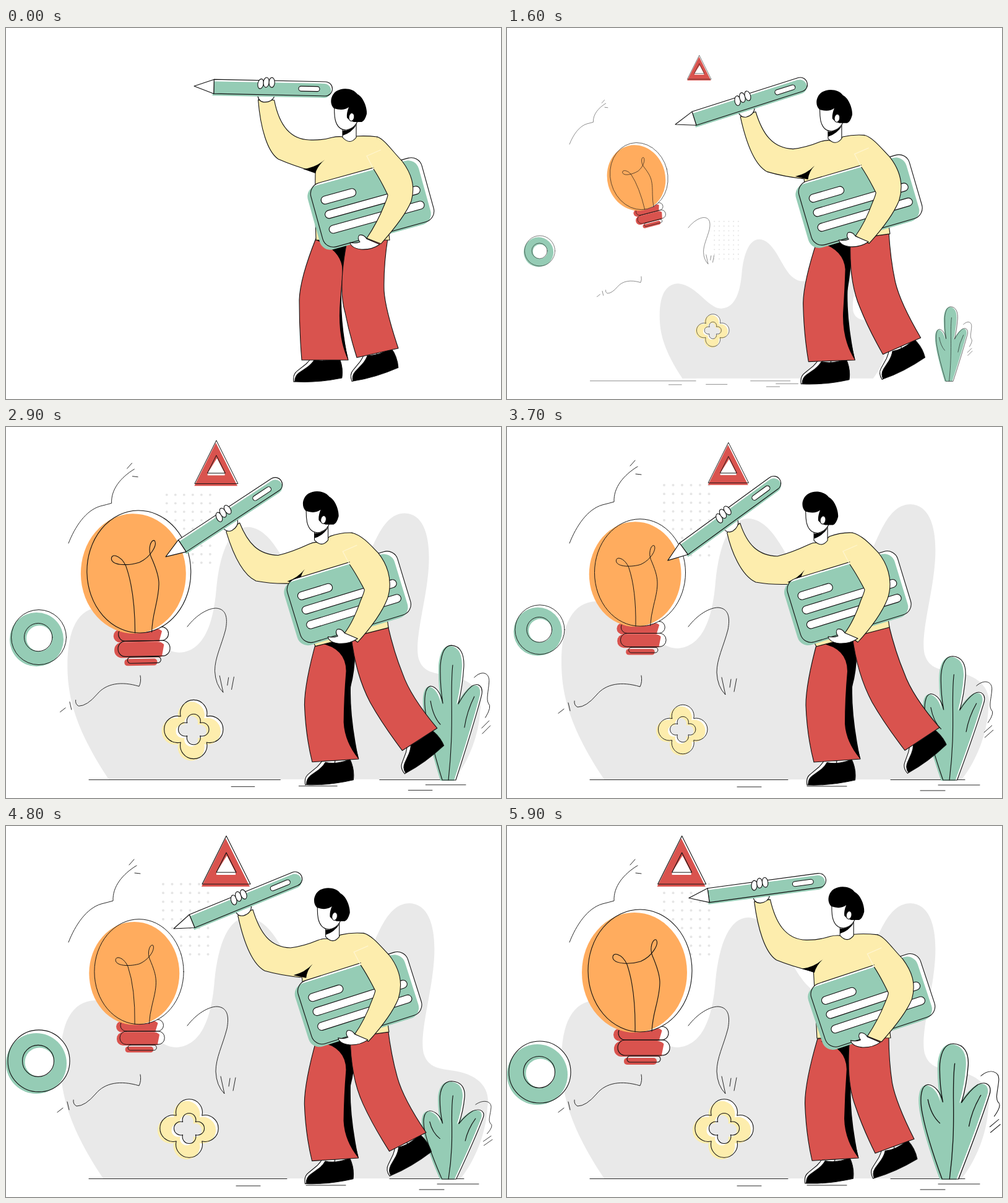
Recreate the animation shown at these times as an HTML page. Size 800x600 px, loop 6 s.

```html
<!DOCTYPE html>
<html lang="en">
<head>
<meta charset="utf-8">
<title>Idea and pencil</title>
<style>
html, body { margin: 0; width: 100%; height: 100%; overflow: hidden; background: #fff; }
svg { display: block; width: 800px; height: 600px; }
.ink { stroke: #111; stroke-width: 1.1; stroke-linejoin: round; stroke-linecap: round; }
.line { fill: none; }
.thin { stroke-width: .9; }
.white { fill: #fff; }
.green { fill: #95ccb5; }
.yellow { fill: #fdedad; }
.red { fill: #d9534e; }
.orange { fill: #ffac5e; }
.grey { fill: #e9e9e9; }
</style>
</head>
<body>
<svg viewBox="0 0 800 600">
  <defs>
    <path id="tri" d="M0-56L39 22H-39Z"/>
    <path id="penBody" d="M32-11.5H212A11.5 11.5 0 0 1 212 11.5H32Z"/>
    <rect id="card" x="-93" y="-53.5" width="186" height="107" rx="18"/>
    <path id="leaves" d="M705 571Q685 505 679 468C674 440 677 420 686 419C696 420 703 432 706 447Q701 415 702 385C704 362 711 353 720 353C735 354 741 368 740 388Q738 420 731 448Q742 428 753 419C765 412 773 421 768 437Q755 485 727 571Z"/>
    <path id="flowerShape" fill-rule="evenodd" d="M-21-21a21.6 21.6 0 1 1 42 0a21.6 21.6 0 1 1 0 42a21.6 21.6 0 1 1-42 0a21.6 21.6 0 1 1 0-42zM-10.5-10.5a11 11 0 1 1 21 0a11 11 0 1 1 0 21a11 11 0 1 1-21 0a11 11 0 1 1 0-21z"/>
    <g id="shoe">
      <path class="ink white" d="M-2 0Q-3-12 5-17L20-27Q26-32 30-37L50-34L40-5Z"/>
      <path class="ink" d="M0 0Q0-9 8-14L22-22Q30-27 34-33Q52-27 74-34Q80-17 76 0Q35 5 0 0Z"/>
    </g>
  </defs>

  <g id="hills">
    <path class="grey" d="M157 570C100 485 88 430 88 380C88 320 105 283 145 282C200 287 235 358 275 358C320 356 333 300 337 250C343 190 360 148 390 148C430 150 450 210 475 245C495 275 530 290 560 255C595 210 605 125 652 125C690 126 697 180 690 235C685 280 668 340 675 368C683 392 700 392 730 397C770 405 783 430 778 455C776 500 755 545 735 570Z"/>
    <g id="dots" fill="#e5e5e5"></g>
  </g>

  <g class="ink line thin">
    <path id="ground" d="M134 570.5H454M620 570.5H740M697 579H764M668 588H708M372 582H411M485 581H549"/>
    <path id="twigA" d="M101 188C112 160 130 133 154 126Q166 123 173 121C172 98 188 78 211 64M199 63L207 54M208 76L217 77"/>
    <path id="twigB" d="M293 323C308 303 328 292 341 292C358 293 361 308 357 328C350 355 339 375 339 397Q340 420 353 433L347 405M362 408L360 421M371 407L367 428"/>
    <path id="twigC" d="M217 402Q219 412 215 420C185 411 160 415 145 433Q128 453 114 453Q108 450 109 443M99 446L102 459M83 463L92 456"/>
  </g>

  <g id="ring">
    <circle class="white" r="50"/>
    <circle class="green" cx="-4" cy="4" r="49"/>
    <circle class="white" cx="1" cy="2" r="23.5"/>
    <circle class="ink line" r="50"/>
    <circle class="ink line" cx="-1" r="25.5"/>
  </g>

  <g id="flower">
    <use href="#flowerShape" class="white"/>
    <use href="#flowerShape" class="yellow" x="-4" y="3"/>
    <use href="#flowerShape" class="ink line"/>
  </g>

  <g id="triangle">
    <use href="#tri" class="white"/>
    <use href="#tri" class="red" x="-1" y="4"/>
    <path class="white" d="M1-24L15 3V7H-16V3Z"/>
    <use href="#tri" class="ink line"/>
    <path class="ink line" d="M0-29L16 3H-16Z"/>
  </g>

  <g id="plant">
    <use href="#leaves" class="white"/>
    <use href="#leaves" class="green" x="-3" y="1"/>
    <use href="#leaves" class="ink line"/>
    <path class="ink line" d="M722 385C717 430 725 480 715 571M686 443Q690 468 702 481M757 436Q745 460 741 486"/>
    <path class="ink line thin" d="M757 405C770 392 782 398 781 412C780 428 776 440 780 447Q786 452 775 470M769 487L781 475M770 496L783 483"/>
  </g>

  <g id="bulb"><g transform="translate(-215 -246)">
    <g class="red">
      <rect x="172" y="327" width="81" height="21" rx="10.5"/>
      <rect x="173" y="348" width="83" height="25" rx="12"/>
      <rect x="189" y="375" width="53" height="11" rx="5"/>
    </g>
    <path class="white" d="M252 326Q262 328 262 336Q260 346 250 347Q263 349 263 358Q261 369 250 370L254 350L246 346Z"/>
    <g class="ink line">
      <rect x="180" y="324" width="81" height="22" rx="11"/>
      <rect x="179" y="346" width="84" height="25" rx="12"/>
      <rect x="194" y="372" width="54" height="10" rx="5"/>
    </g>
    <ellipse class="white" cx="215" cy="234" rx="84" ry="99"/>
    <ellipse class="orange" cx="206" cy="237" rx="85" ry="97"/>
    <ellipse class="ink line" cx="215" cy="234" rx="84" ry="99"/>
    <path class="ink line" d="M207 333Q208 265 194 224C186 206 170 203 171 213C173 224 200 224 216 219C236 210 246 190 241 184C235 182 230 198 235 210C250 245 250 255 240 295Q235 315 234 332"/>
  </g></g>

  <g id="person">
    <use id="frontShoe" href="#shoe"/>
    <use id="backShoe" href="#shoe"/>
    <path id="frontLeg" class="ink red"/>
    <path id="legShade"/>
    <path id="backLeg" class="ink red"/>
    <path id="shirt" class="ink yellow"/>
    <path id="armpit"/>
    <g id="board">
      <use href="#card" class="white"/>
      <use href="#card" class="green" x="-6" y="3"/>
      <use href="#card" class="ink line"/>
      <g class="ink white">
        <rect x="-79" y="-30.5" width="58" height="13" rx="6.5"/>
        <rect x="-79" y="-6.5" width="159" height="13" rx="6.5"/>
        <rect x="-79" y="18.5" width="159" height="13" rx="6.5"/>
      </g>
    </g>
    <path id="arm" class="ink yellow"/>
    <path id="hand" class="ink white" d="M604 350Q591 359 574 358Q558 356 556 347Q564 349 572 346Q567 340 571 335Q578 333 583 341Z"/>
    <path id="seam" fill="none" stroke="#fff5cf" stroke-width="1.3" d="M594 228L583 207L606 197"/>
    <g id="head">
      <path class="ink white" d="M544 160V177Q556 190 566 177V152"/>
      <path d="M544 166Q557 166 567 156Q558 170 544 174Z"/>
      <path class="ink white" d="M531 122Q530 138 532 148Q536 165 550 165Q565 162 569 148L560 118Z"/>
      <path d="M530 130C522 122 525 108 534 102C545 95 562 98 568 107C578 112 584 130 583 139Q580 150 575 152L562 152Q555 150 551 145Q550 138 554 128Q545 135 530 130Z"/>
      <ellipse class="ink white" cx="558.5" cy="144" rx="4.3" ry="6.5" transform="rotate(10 558.5 144)"/>
    </g>
    <g id="pen">
      <path class="ink white" d="M103 10Q103 22 113 23.5Q126 24 130 14Z"/>
      <use href="#penBody" class="white"/>
      <use href="#penBody" class="green" x="-2" y="3"/>
      <use href="#penBody" class="ink line"/>
      <path class="ink white" d="M0 0L32-11.5V11.5Z"/>
      <rect class="ink white" x="169" y="-3.5" width="34" height="8" rx="4"/>
      <g class="ink white">
        <ellipse cx="107.5" cy="-6" rx="4.6" ry="8" transform="rotate(10 107.5 -6)"/>
        <ellipse cx="116.5" cy="-8.5" rx="4.6" ry="8" transform="rotate(6 116.5 -8.5)"/>
        <ellipse cx="125.5" cy="-8.5" rx="4.6" ry="8"/>
      </g>
    </g>
  </g>
</svg>
<script>
const LOOP = 6000, STEP = 100;
const $ = id => document.getElementById(id);
const place = (id, v) => $(id).setAttribute('transform', v);
const draw = (id, d) => $(id).setAttribute('d', d);

// Piecewise linear track: [time, value, time, value, ...] in seconds
function at(keys, t) {
  let i = 2;
  while (i < keys.length - 2 && t > keys[i]) i += 2;
  const [t0, v0, t1, v1] = keys.slice(i - 2, i + 2);
  return v0 + (v1 - v0) * Math.min(1, (t - t0) / (t1 - t0));
}

// Blend two paths that share the same commands
const NUM = /-?\d+(\.\d+)?/g;
function mix([a, b], k) {
  const to = b.match(NUM);
  let i = 0;
  return a.replace(NUM, n => (+n + (to[i++] - n) * k).toFixed(2) + ' ');
}

const grow = (id, x, y, s) => place(id, `translate(${x} ${y}) scale(${s})`);
const growFrom = (id, x, y, s) => place(id, `translate(${x} ${y}) scale(${s}) translate(${-x} ${-y})`);

const pose = {
  frontLeg: ['M501 340Q475 405 474 440Q474 490 478 537L553 537Q536 470 543 410Q547 385 553 340Z',
             'M502 345Q483 415 483 450Q485 500 496 542L571 537Q554 480 558 410Q562 385 566 335Z'],
  legShade: ['M501 343Q538 358 543 385Q545 405 540 440Q535 500 553 537Q541 480 542 430Q543 400 553 352L551 340Z',
             'M508 350Q550 358 550 395Q546 440 546 480Q548 510 571 537Q557 470 558 420Q568 385 564 345L562 340Z'],
  backLeg: ['M552 340Q536 420 548 460Q555 495 567 533L634 518Q613 455 611 425Q610 385 617 340Z',
            'M558 338Q566 400 590 445Q610 480 643 523L699 486Q655 435 642 398Q628 365 617 320Z'],
  joint: ['M600 176', 'M558 171'],
  shoulder: ['Q583 174 566 175Q556 186 545 176Q536 175 527 177Q510 182 490 181C455 180 440 150',
             'Q540 170 521 177Q510 188 499 187Q494 187 488 190Q458 204 437 209C405 208 388 190'],
  forearm: ['C411 160 422 200 440 212Q465 223 500 233',
            'C362 200 378 240 402 251Q430 256 462 254'],
  torso: ['Q499 290 501 343L620 343Q612 270 600 176Z',
          'Q470 300 500 355L618 324Q612 270 558 171Z'],
  armpit: ['M480 228Q500 226 515 213Q503 224 500 235Z',
           'M453 251Q470 245 481 231Q474 240 474 254Z'],
  arm: ['M600 176C612 180 625 200 640 215C655 235 662 255 655 280Q645 305 606 349L583 340Q600 315 612 285Q617 273 617 270Q605 245 594 228',
        'M558 171C575 175 590 193 600 203C612 218 626 245 615 278Q602 310 567 348L546 333Q560 315 572 280Q578 266 578 263Q565 238 554 222']
};

const track = {
  torso: [0, 0, 3, 1, 3.75, 1, 6, -.03],
  head: [0, 0, 3, .98, 3.75, 1, 6, .08],
  front: [0, 0, 3, .97, 3.75, 1, 6, .83],
  back: [0, 0, 3, 1, 3.75, 1, 6, .34],
  tilt: [0, -15.5, 3, -17, 3.75, -17, 6, -18.4],
  penX: [0, 304, .8, 285, 1.6, 272, 3, 257, 3.75, 260, 4.8, 271, 6, 296],
  penY: [0, 94, .8, 125, 1.6, 156, 3, 214, 3.75, 216, 4.8, 166, 6, 112],
  penTurn: [0, 1.2, .8, -8.2, 1.6, -17.7, 3, -34.6, 3.75, -36.2, 6, -6.4],
  ringY: [0, 385.5, 3, 338.5, 3.75, 327, 4.5, 375, 6, 399.6],
  ring: [0, 0, 3, .92, 3.75, .79, 4.5, 1],
  triX: [0, 275, 4.5, 376, 6, 276],
  tri: [0, 0, 3, .923, 3.75, .826, 4.5, 1],
  flowerX: [0, 369, 3, 301, 3.75, 283, 4.5, 281, 6, 356],
  flower: [0, 0, 3, 1.034, 3.75, .82, 4.5, .99],
  plantW: [0, 0, 3, 1.03, 3.75, 1.04, 4.5, 1, 6, 1.22],
  plantH: [0, 0, 3, 1.034, 3.75, .91, 4.5, .65, 6, 1.03],
  bulb: [0, 0, 3, 1.034, 3.75, .864, 4.5, .82, 6, 1.013]
};

for (let i = 0; i < 54; i++) {
  const dot = document.createElementNS('http://www.w3.org/2000/svg', 'circle');
  dot.setAttribute('cx', 254 + i % 6 * 14.5);
  dot.setAttribute('cy', 94 + Math.floor(i / 6) * 14.2);
  dot.setAttribute('r', 2);
  $('dots').append(dot);
}

function drawScene(t) {
  const s = Math.min(1, t / 3);
  growFrom('hills', 428, 563, s);
  growFrom('ground', 135, 571, s);
  growFrom('twigA', 101, 188, s);
  growFrom('twigB', 293, 323, s);
  growFrom('twigC', 217, 402, s);
  grow('ring', 53, at(track.ringY, t), at(track.ring, t));
  grow('flower', at(track.flowerX, t), 489, at(track.flower, t));
  grow('triangle', at(track.triX, t), 72, at(track.tri, t));
  growFrom('plant', 714, 571, `${at(track.plantW, t)} ${at(track.plantH, t)}`);
  place('bulb', `translate(215 246) rotate(${-31 * (1 - s)}) scale(${at(track.bulb, t)})`);
}

function drawPerson(t) {
  const k = at(track.torso, t), h = at(track.head, t);
  const f = at(track.front, t), b = at(track.back, t);

  place('frontShoe', `translate(${467 + 20 * f} ${572 + 7 * f}) rotate(${-4.5 - 1.5 * f})`);
  place('backShoe', `translate(${561 + 88 * b} ${571 - 12 * b * b}) rotate(${-16.6 - 20 * b})`);
  draw('frontLeg', mix(pose.frontLeg, f));
  draw('legShade', mix(pose.legShade, f));
  draw('backLeg', mix(pose.backLeg, b));

  const x = at(track.penX, t), y = at(track.penY, t), turn = at(track.penTurn, t);
  const c = Math.cos(turn * Math.PI / 180), n = Math.sin(turn * Math.PI / 180);
  const onPen = (u, v) => `${x + u * c - v * n} ${y + u * n + v * c}`;
  place('pen', `translate(${x} ${y}) rotate(${turn})`);
  draw('shirt', mix(pose.joint, k) + mix(pose.shoulder, h) + onPen(130, 20) +
    'L' + onPen(104, 20) + mix(pose.forearm, h) + mix(pose.torso, k));
  draw('armpit', mix(pose.armpit, h));

  place('board', `translate(${592 - 39 * k} ${282 - 7.5 * k}) rotate(${at(track.tilt, t)})`);
  draw('arm', mix(pose.arm, k));
  place('hand', `translate(${-37 * k} ${-8 * k})`);
  place('seam', `translate(${-40 * k} ${-6 * k})`);
  place('head', `translate(${-48 * h} ${6.5 * h * h})`);
}

function frame() {
  const t = Math.floor(performance.now() % LOOP / STEP) * STEP / 1000;
  drawScene(t);
  drawPerson(t);
  requestAnimationFrame(frame);
}
frame();
</script>
</body>
</html>
```
